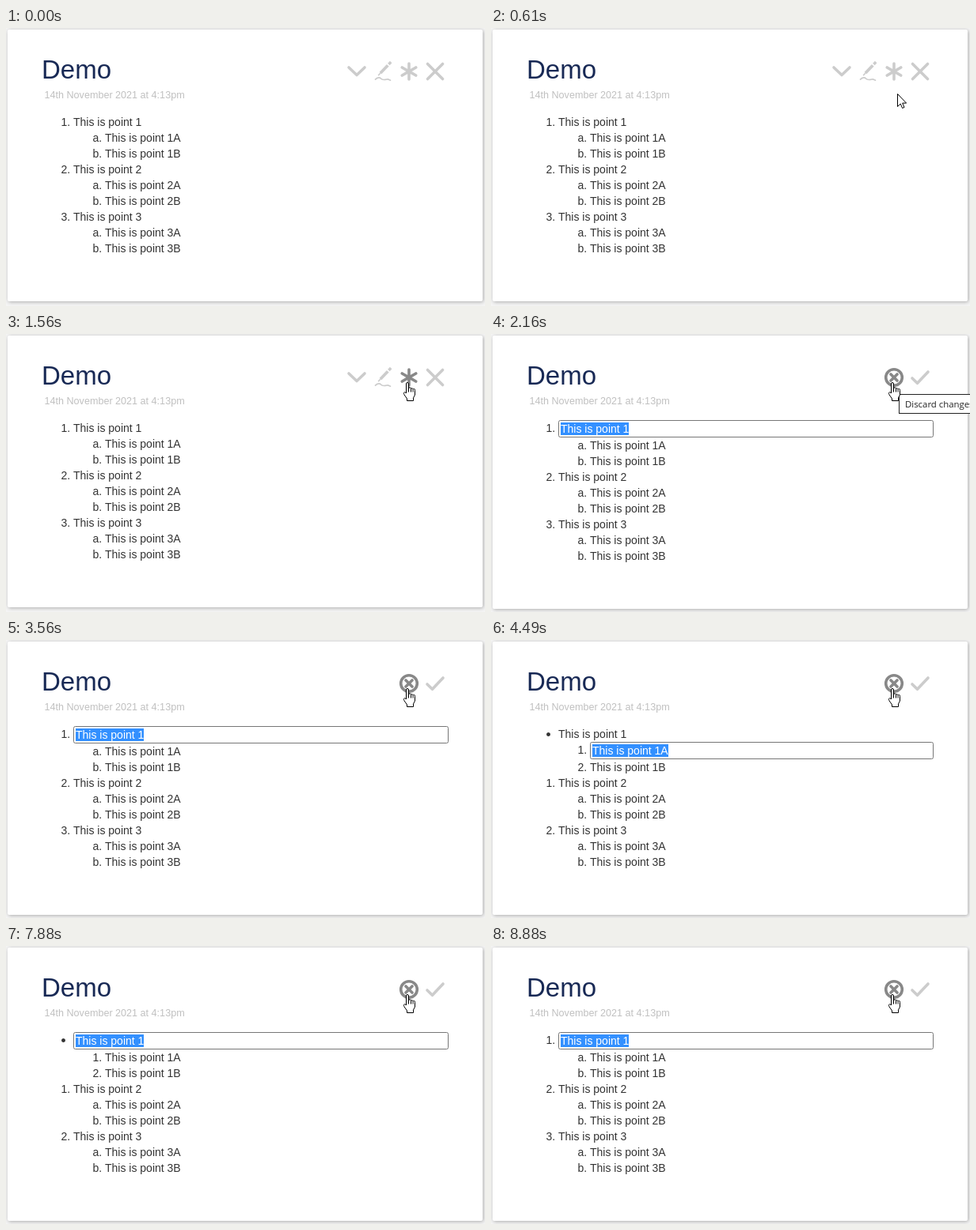
These frames come from a looping animation (605x352 px, 9.56 s). An HTML page:

```html
<!DOCTYPE html>
<html lang="en">
<head>
<meta charset="utf-8">
<title>Demo</title>
<style>
  html, body { margin: 0; width: 100%; height: 100%; overflow: hidden; background: #f4f4f4; }
  #panel {
    position: absolute; left: 2px; top: 2px; width: 600px; height: 344px;
    background: #fff; border-radius: 2px; box-shadow: 1px 1px 5px rgba(0, 0, 0, .3);
  }
  svg { position: absolute; left: 0; top: 0; display: block; }
  text { font: 14px "Liberation Sans", Arial, sans-serif; fill: #333; white-space: pre; }
  #title { font-size: 33px; fill: #182955; }
  #date { font-size: 12.6px; fill: #c0c0c0; }
  #tip text { font: 11.4px "Open Sans", sans-serif; fill: #222; }
  .icon { fill: none; stroke: #ccc; stroke-width: 3.6; stroke-linecap: round; stroke-linejoin: round; }
  .icon.hot { stroke: #888; }
  .cursor { fill: #fff; stroke: #000; stroke-width: 1; stroke-linejoin: round; }
</style>
</head>
<body>
<div id="panel"></div>
<svg width="605" height="352" viewBox="0 0 605 352">
  <text id="title" x="45" y="64">Demo</text>
  <text id="date" x="48.5" y="89">14th November 2021 at 4:13pm</text>

  <g id="viewIcons">
    <path class="icon" d="M433 50L443 59.5L453 50"/>
    <g class="icon">
      <path stroke-width="3.8" stroke-linecap="butt" d="M473 57L482.3 47.2"/>
      <path stroke-width="3.4" stroke-linecap="butt" d="M483.4 46L486.2 43"/>
      <path stroke-width="1.6" d="M473 57L470.6 59.6"/>
      <path stroke-width="1.7" d="M466.5 65.2C469 62.5 472 62.2 473.5 64S479 65.5 481 65S484 65.5 485.5 66.2"/>
    </g>
    <path id="star" class="icon" d="M509 45V65M500.3 50L517.7 60M517.7 50L500.3 60"/>
    <path class="icon" d="M532.5 45.5L551.5 64.5M551.5 45.5L532.5 64.5"/>
  </g>
  <g id="editIcons">
    <g id="cancel" class="icon">
      <circle cx="509" cy="55" r="10.3"/>
      <path d="M505 51L513 59M513 51L505 59"/>
    </g>
    <path class="icon" d="M532 56L538.5 62.3L552 48"/>
  </g>

  <g id="field">
    <rect id="box" height="21" rx="2" fill="#fff" stroke="#767676"/>
    <rect id="mark" height="16" fill="#3390ff"/>
  </g>
  <g id="list"></g>

  <g id="tip">
    <rect x="515.5" y="76.5" width="180" height="24" fill="#fff" stroke="#222"/>
    <text x="523" y="93">Discard changes to this tiddler</text>
  </g>
  <path id="arrow" class="cursor" d="M.5 .5V16.5L4.2 13L6.6 18.5L9 17.4L6.7 12.1H11.6Z"/>
  <g id="hand" class="cursor">
    <path d="M505.5 75V63a1.5 1.5 0 0 1 3 0V69a1.5 1.5 0 0 1 3 .5a1.4 1.4 0 0 1 2.6 .8a1.3 1.3 0 0 1 2.4 1V77L514.5 81V84.5H506.5V82L502.8 76.5C501.6 74 503.5 72.5 505.5 75Z"/>
    <path d="M508.5 69V73.5M511.5 69.5V73.5M514.1 70.5V73.5"/>
  </g>
</svg>
<script>
  const LOOP = 9560;
  const $ = id => document.getElementById(id);
  const set = (el, attrs) => { for (const k in attrs) el.setAttribute(k, attrs[k]); };
  const show = (id, on) => { $(id).style.display = on ? "" : "none"; };
  const make = (tag, attrs) => {
    const el = document.createElementNS("http://www.w3.org/2000/svg", tag);
    set(el, attrs);
    return $("list").appendChild(el);
  };

  // Pointer positions: time, x, y
  const path = [
    [200, 565, 330], [270, 560, 280], [340, 548, 220], [410, 537, 165],
    [480, 527, 125], [540, 519, 100], [610, 513, 83], [680, 508, 72],
    [750, 500, 60], [820, 494, 50], [890, 489, 43], [960, 490, 45],
    [1030, 493, 49], [1360, 505, 54]
  ];

  // Changes of state, each kept until the next one
  const steps = [
    [0, { edit: -1, top: "num", sub: "alpha", hand: false, hot: false, tip: false }],
    [1560, { hand: true, hot: true }],
    [1630, { edit: 0, hot: false }],
    [1690, { hot: true }],
    [2160, { tip: true }],
    [3560, { tip: false }],
    [3830, { top: "disc", sub: "num" }],
    [4490, { edit: 1 }],
    [5420, { sub: "circle" }],
    [7080, { sub: "num" }],
    [7880, { edit: 0 }],
    [8880, { top: "num", sub: "alpha" }]
  ];

  const rows = [];
  for (let n = 1; n <= 3; n++) {
    for (const letter of ["", "A", "B"]) {
      const x = letter ? 125 : 85;
      const text = make("text", {});
      text.textContent = "This is point " + n + letter;
      rows.push({
        n, letter, x, text,
        label: make("text", { x: x - 15.56 }),
        dot: make("circle", { cx: x - 12.5, stroke: "#333" })
      });
    }
  }

  function label(row, s) {
    if (!row.letter) {
      if (s.top === "num") return row.n + ".";
      return row.n === 1 ? "disc" : row.n - 1 + ".";
    }
    if (row.n > 1 || s.sub === "alpha") return row.letter.toLowerCase() + ".";
    return s.sub === "num" ? (row.letter === "A" ? "1." : "2.") : "circle";
  }

  function drawRow(row, i, s) {
    const active = i === s.edit;
    const y = 124 + 20 * i + (s.edit >= 0 && i > s.edit ? 2 : 0);
    set(row.text, { x: row.x + (active ? 3 : 0), y: y + (active ? 1 : 0) });
    row.text.style.fill = active ? "#fff" : "";
    const mark = label(row, s);
    const bullet = mark === "disc" || mark === "circle";
    row.label.textContent = bullet ? "" : mark;
    set(row.label, { y });
    row.dot.style.display = bullet ? "" : "none";
    set(row.dot, { cy: y - 4.5, r: 2, fill: mark === "disc" ? "#333" : "none" });
    if (active) {
      set($("box"), { x: row.x + .5, y: y - 14.5, width: 473 - (row.x - 85) });
      set($("mark"), { x: row.x + 3, y: y - 12, width: row.letter ? 96 : 86 });
    }
  }

  function draw(s) {
    const editing = s.edit >= 0;
    $("panel").style.height = (editing ? 346 : 344) + "px";
    show("viewIcons", !editing);
    show("editIcons", editing);
    show("field", editing);
    show("tip", s.tip);
    show("hand", s.hand);
    $("star").classList.toggle("hot", s.hot);
    $("cancel").classList.toggle("hot", s.hot);
    rows.forEach((row, i) => drawRow(row, i, s));
  }

  const start = performance.now();
  let last = "";
  function tick() {
    const t = (performance.now() - start) % LOOP;
    const past = steps.filter(step => step[0] <= t);
    const s = Object.assign({}, ...past.map(step => step[1]));
    const key = JSON.stringify(s);
    if (key !== last) draw(s);
    last = key;

    const at = path.filter(p => p[0] <= t).pop();
    show("arrow", at && !s.hand);
    if (at) set($("arrow"), { transform: `translate(${at[1]} ${at[2]})` });
    requestAnimationFrame(tick);
  }
  tick();
</script>
</body>
</html>
```
